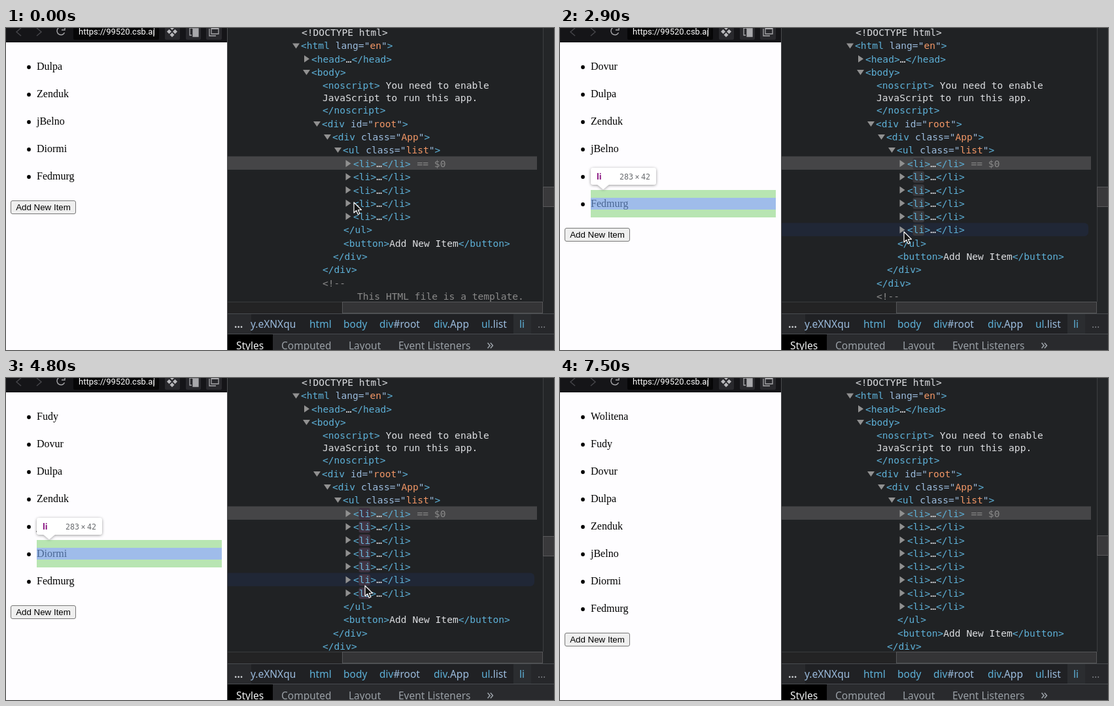
Animation, 838 px wide and 493 px high, one loop 7700 ms. Source, as an HTML page:

```html
<!DOCTYPE html>
<html lang="en">
<head>
<meta charset="utf-8">
<title>List inspector</title>
<style>
html, body { margin: 0; width: 100%; height: 100%; overflow: hidden; background: #fefdff; }
svg { display: block; }
text { white-space: pre; }
.code { font: 14.6px "DejaVu Sans Mono", monospace; fill: #dcdee1; }
.tag { fill: #5db0d7; }
.attr { fill: #9bbbdc; }
.val { fill: #f29766; }
.note { fill: #898989; }
.ui { font: 15.5px "Noto Sans", "Open Sans", sans-serif; }
.page { font: 16px "Liberation Serif", serif; }
.btn { font: 13.33px "Liberation Sans", sans-serif; }
.url { font: 13px Roboto, sans-serif; fill: #fff; }
.tipTag { font: bold 12.5px "Noto Sans", sans-serif; fill: #881280; }
.tipSize { font: 11.7px "DejaVu Sans Mono", monospace; fill: #6a6d70; }
</style>
</head>
<body>
<svg width="838" height="493" viewBox="0 0 838 493">
  <defs>
    <clipPath id="tree"><rect x="339" width="482" height="419"/></clipPath>
    <clipPath id="field"><rect x="104" width="123" height="22"/></clipPath>
    <filter id="soft" x="-20%" y="-40%" width="140%" height="190%">
      <feDropShadow dx="0" dy="1" stdDeviation="2" flood-opacity=".4"/>
    </filter>
  </defs>
  <rect width="338" height="493" fill="#fefdff"/>
  <g id="page"></g>

  <rect width="338" height="22" fill="#151518"/>
  <rect x="103" y="-5" width="131" height="23" rx="2" fill="#060607"/>
  <text class="url" x="111" y="9.5" clip-path="url(#field)">https://99520.csb.app</text>
  <path d="M226.5 0V11" stroke="#ddd"/>
  <g fill="none" stroke="#47474b" stroke-width="1.4">
    <path d="M23 0L16 6L23 12M47 0L54 6L47 12"/>
    <path d="M88 0A6 6 0 1 0 89.5 7M90 -2V3H85" stroke="#a5a5a8"/>
  </g>
  <g fill="#29292d">
    <rect x="243" y="-6" width="23" height="24" rx="2"/>
    <rect x="275" y="-6" width="23" height="24" rx="2"/>
    <rect x="306" y="-6" width="24" height="24" rx="2"/>
  </g>
  <path fill="#b9b9bc" d="M254 -3l3 3l-3 3l-3 -3zM249.500 2l3.500 3.500l-3.500 3.500l-3.500 -3.500zM258.500 2l3.500 3.500l-3.500 3.500l-3.500 -3.500zM254 7l3.500 3.500l-3.500 3.500l-3.500 -3.500z"/>
  <path fill="none" stroke="#a9a9ac" stroke-width="1.300" d="M284 11H281V0H286M286 1H294V13H286ZM314 9H325V-2H314ZM311 1V12H321"/>
  <path fill="#a9a9ac" d="M286 1h8v12h-8zM314 -2h11v4h-11z"/>

  <rect x="338" width="500" height="493" fill="#202224"/>
  <path d="M338.500 0V493" stroke="#4b4c4f"/>
  <g id="dom" clip-path="url(#tree)"></g>

  <rect x="821" width="17" height="437" fill="#242628"/>
  <path d="M821.500 0V419" stroke="#3c3e40"/>
  <rect id="thumb" x="821.500" width="18" height="30" fill="#39393b" stroke="#59595b"/>
  <rect x="339" y="419" width="482" height="18" fill="#232324"/>
  <path d="M339 419.500H821" stroke="#3a3b3d"/>
  <rect x="514.500" y="419.500" width="306" height="17" fill="#343436" stroke="#555658"/>

  <rect x="339" y="437" width="499" height="32" fill="#202124"/>
  <path d="M339 437.500H838M339 468.500H838" stroke="#494c50"/>
  <rect x="339" y="438" width="36" height="30" fill="#292a2d"/>
  <rect x="776" y="438" width="27" height="30" fill="#2b2d30"/>
  <rect x="803" y="438" width="35" height="30" fill="#26272a"/>
  <g id="crumbs" class="ui"></g>
  <rect x="339" y="469" width="499" height="24" fill="#292a2d"/>
  <rect x="339" y="469" width="69" height="24" fill="#000"/>
  <g id="tabs" class="ui"></g>

  <g id="over"></g>
  <g id="cursor"></g>
</svg>
<script>
const LOOP = 7700, STEP = 100, PITCH = 20.28, ROW = 197, ITEM = 42;
const $ = id => document.getElementById(id);
const clicks = [1700, 3900, 5900], lag = 200;
const names = ["Wolitena", "Fudy", "Dovur", "Dulpa", "Zenduk", "jBelno", "Diormi", "Fedmurg"];

// time, x, y of the pointer
const path = [
  [0, 532, 267], [100, 534, 279], [200, 534, 279], [400, 430, 292], [500, 300, 321],
  [700, 150, 305], [1000, 101, 268], [1100, 79, 265], [1800, 79, 265], [1900, 140, 258],
  [2100, 470, 214], [2200, 517, 208], [2400, 522, 208], [2700, 528, 255], [2900, 526, 312],
  [3000, 470, 312], [3100, 300, 377], [3200, 240, 360], [3400, 140, 330], [3700, 92, 316],
  [4000, 92, 316], [4100, 180, 300], [4300, 530, 232], [4400, 555, 245], [4500, 555, 250],
  [4800, 549, 318], [4900, 545, 330], [5000, 470, 348], [5100, 300, 394], [5600, 98, 355],
  [6300, 98, 355], [6500, 330, 275], [6600, 430, 250], [6700, 528, 212], [7200, 530, 350],
  [7300, 300, 370]
];

const rect = (x, y, w, h, fill, more = "") =>
  `<rect x="${x}" y="${y}" width="${w}" height="${h}" fill="${fill}" ${more}/>`;
const text = (x, y, cls, body, more = "") =>
  `<text x="${x}" y="${y}" class="${cls}" ${more}>${body}</text>`;
const span = (cls, s) => `<tspan class="${cls}">${s.replace(/</g, "&lt;")}</tspan>`;
const tag = s => span("tag", s);
const attr = (name, value) => span("attr", ` ${name}="`) + span("val", value) + span("attr", '"');
const open = (x, y) => `<path d="M${x} ${y - 9}h11l-5.500 8z" fill="#919191"/>`;
const shut = (x, y) => `<path d="M${x} ${y - 11}v11l8 -5.500z" fill="#919191"/>`;
const code = (x, y, body) => text(x, y, "code", body);

const head = (() => {
  const y = i => 12.2 + i * PITCH;
  return code(452, y(0), "&lt;!DOCTYPE html>")
    + open(438, y(1)) + code(451, y(1), tag("<html") + attr("lang", "en") + tag(">"))
    + shut(456, y(2)) + code(467, y(2), tag("<head>") + "…" + tag("</head>"))
    + open(454, y(3)) + code(467, y(3), tag("<body>"))
    + code(484, 93, tag("<noscript>") + " You need to enable")
    + code(484, 112, "JavaScript to run this app.")
    + code(484, 131, tag("</noscript>"))
    + open(470, 152) + code(483, 152, tag("<div") + attr("id", "root") + tag(">"))
    + open(486, 172) + code(499, 172, tag("<div") + attr("class", "App") + tag(">"))
    + open(502, 192) + code(515, 192, tag("<ul") + attr("class", "list") + tag(">"));
})();

$("crumbs").innerHTML = [
  [374, "", "y.eXNXqu"], [464, "html", ""], [516, "body", ""], [571, "div", "#root"],
  [654, "div", ".App"], [727, "ul", ".list"], [785, "li", ""]
].map(([x, a, b]) => text(x, 459, "", tag(a) + span("attr", b))).join("")
  + text(349, 459, "", "…", 'fill="#cfd1d4" font-weight="bold"')
  + text(813, 459, "", "…", 'fill="#777a7e"');
$("tabs").innerHTML = [
  [352, "Styles"], [421, "Computed"], [524, "Layout"], [600, "Event Listeners"], [735, "»"]
].map(([x, s], i) => text(x, i < 4 ? 491.5 : 492, "", s,
  `fill="${i ? "#9aa0a6" : "#f1f3f4"}"` + (i > 3 ? ' font-size="22"' : ""))).join("");

function ease(x) {
  // cubic-bezier(.25, .1, .25, 1)
  let lo = 0, hi = 1, u = x;
  for (let i = 0; i < 20; i++) {
    u = (lo + hi) / 2;
    const bx = .75 * u * (1 - u) + u ** 3;
    if (bx < x) lo = u; else hi = u;
  }
  return .3 * u * (1 - u) ** 2 + 3 * u * u * (1 - u) + u ** 3;
}
const mix = (a, b, k) => `rgb(${a.map((v, i) => Math.round(v + (b[i] - v) * k))})`;

// update flash: purple to grey, then grey to nothing
function flash(age) {
  if (!(age >= 0 && age < 1400)) return null;
  const k = ease(Math.min(age / 1120, 1));
  return {
    fill: mix([140, 14, 130], [56, 56, 60], k),
    ink: mix([255, 255, 255], [93, 176, 215], k),
    alpha: age < 1120 ? 1 : 1 - ease((age - 1120) / 280)
  };
}

function pointer(t) {
  if (t >= 7400) return null;
  const i = path.findIndex((p, n) => n === path.length - 1 || path[n + 1][0] > t);
  const a = path[i], b = path[i + 1] || a;
  const k = b === a ? 0 : (t - a[0]) / (b[0] - a[0]);
  return { x: a[1] + (b[1] - a[1]) * k, y: a[2] + (b[2] - a[2]) * k };
}

function drawDom(n, hover, glow) {
  let out = rect(339, ROW - .5, 473, 20.5, "#454547");
  if (hover > 0) out += rect(330, ROW + hover * PITCH, 478, PITCH, "#202736", 'rx="6"');
  out += head;
  const y = i => 213 + i * PITCH;
  for (let i = 0; i < n; i++) {
    if (glow) out += rect(539.5, y(i) - 14, 17.5, 17.5, glow.fill, `rx="3" opacity="${glow.alpha}"`);
    const li = glow ? `<tspan fill="${glow.ink}">li</tspan>` : tag("li");
    out += shut(519.5, y(i)) + code(531, y(i), tag("<") + li + tag(">") + "…" + tag("</li>"));
  }
  out += text(628.5, y(0), "code", span("note", "== $0"), 'font-style="italic"');
  out += code(516, y(n), tag("</ul>"))
    + code(516, y(n + 1), tag("<button>") + "Add New Item" + tag("</button>"))
    + code(500, y(n + 2), tag("</div>"))
    + code(484, y(n + 3), tag("</div>"))
    + code(484, y(n + 4), span("note", "<!--"))
    + code(537, y(n + 5), span("note", "This HTML file is a template."));
  return out;
}

function drawPage(n, p) {
  let out = "";
  names.slice(-n).forEach((s, i) => {
    const y = 64 + i * ITEM;
    out += `<circle cx="35" cy="${y - 4}" r="2.900"/>` + text(47, y, "page", s);
  });
  const y = 54 + n * ITEM;
  const over = p && p.x > 7 && p.x < 107 && p.y > y && p.y < y + 21;
  return out + rect(7.5, y + .5, 99, 20, over ? "#e5e5e5" : "#efefef", 'rx="2.500" stroke="#767676"')
    + text(57, y + 15, "btn", "Add New Item", 'text-anchor="middle"');
}

function tip(x, y, w, name, a, b, up) {
  const c = x + 19, base = up ? y + .5 : y + 25.5, apex = up ? y - 7 : y + 33;
  const end = x + w - 9;
  return `<g filter="url(#soft)">` + rect(x, y, w, 26, "#fff", 'rx="4"')
    + `<path d="M${c - 9} ${base}L${c} ${apex}L${c + 9} ${base}z" fill="#fff"/></g>`
    + text(x + 9, y + 17.5, "tipTag", name)
    + text(end - 20, y + 17.5, "tipSize", "×", 'text-anchor="middle"')
    + text(end - 26, y + 17.5, "tipSize", a, 'text-anchor="end"')
    + text(end, y + 17.5, "tipSize", b, 'text-anchor="end"');
}

function drawOver(n, hover) {
  if (hover < 0) return "";
  const blue = "rgba(111,155,223,.66)", green = "#b8e5b2", amber = "rgba(246,178,107,.66)";
  if (hover === n) {
    const h = n * ITEM;
    return rect(7, 22, 323, 16, amber) + rect(7, 38 + h, 323, 16, amber)
      + rect(7, 38, 40, h, "rgba(126,207,115,.55)") + rect(47, 38, 283, h, blue)
      + tip(7, 62 + h, 136, "ul.list", 323, h, true);
  }
  const y = 38 + hover * ITEM;
  return rect(47, y, 283, 12, green) + rect(47, y + 12, 283, 18, blue) + rect(47, y + 30, 283, 12, green)
    + tip(47, hover ? y - 34 : y + 50, 100, "li", 283, 42, !hover);
}

function drawCursor(n, p) {
  if (!p) return "";
  const i = Math.round((p.y - 59) / ITEM);
  const beam = i >= 0 && i < n && p.x > 47 && p.x < 107 && Math.abs(p.y - 59 - i * ITEM) < 9;
  const at = `transform="translate(${p.x.toFixed(1)} ${p.y.toFixed(1)})"`;
  if (beam) {
    const d = "M-4 -8H-1L0 -7L1 -8H4M0 -7V7M-4 8H-1L0 7L1 8H4";
    return `<g ${at} fill="none"><path d="${d}" stroke="#fff" stroke-width="3"/><path d="${d}" stroke="#111" stroke-width="1.300"/></g>`;
  }
  return `<path ${at} d="M0 0V16L3.700 12.500L6.300 18.500L9 17.300L6.400 11.500H11.500Z" fill="#141414" stroke="#fff" stroke-width="1.200" stroke-linejoin="round"/>`;
}

function render(t) {
  const count = d => 5 + clicks.filter(c => t >= c + d).length;
  const n = count(0), rows = count(lag), p = pointer(t);
  let hover = -1;
  if (p && t >= 100 && p.x > 339) {
    const r = Math.floor((p.y - ROW) / PITCH);
    if (r >= 0 && r <= rows) hover = r;
  }
  const last = clicks.filter(c => t >= c + lag).pop();
  $("page").innerHTML = drawPage(n, p);
  $("dom").innerHTML = drawDom(rows, hover, flash(t - last - lag));
  $("thumb").setAttribute("y", rows < 7 ? 243.5 : rows < 8 ? 242.5 : 241.5);
  $("over").innerHTML = drawOver(rows, hover);
  $("cursor").innerHTML = drawCursor(n, p);
}

let start = null, shown = -1;
function tick(now) {
  if (start === null) start = now;
  const t = Math.floor(((now - start) % LOOP) / STEP) * STEP;
  if (t !== shown) render(shown = t);
  requestAnimationFrame(tick);
}
render(0);
requestAnimationFrame(tick);
</script>
</body>
</html>
```
